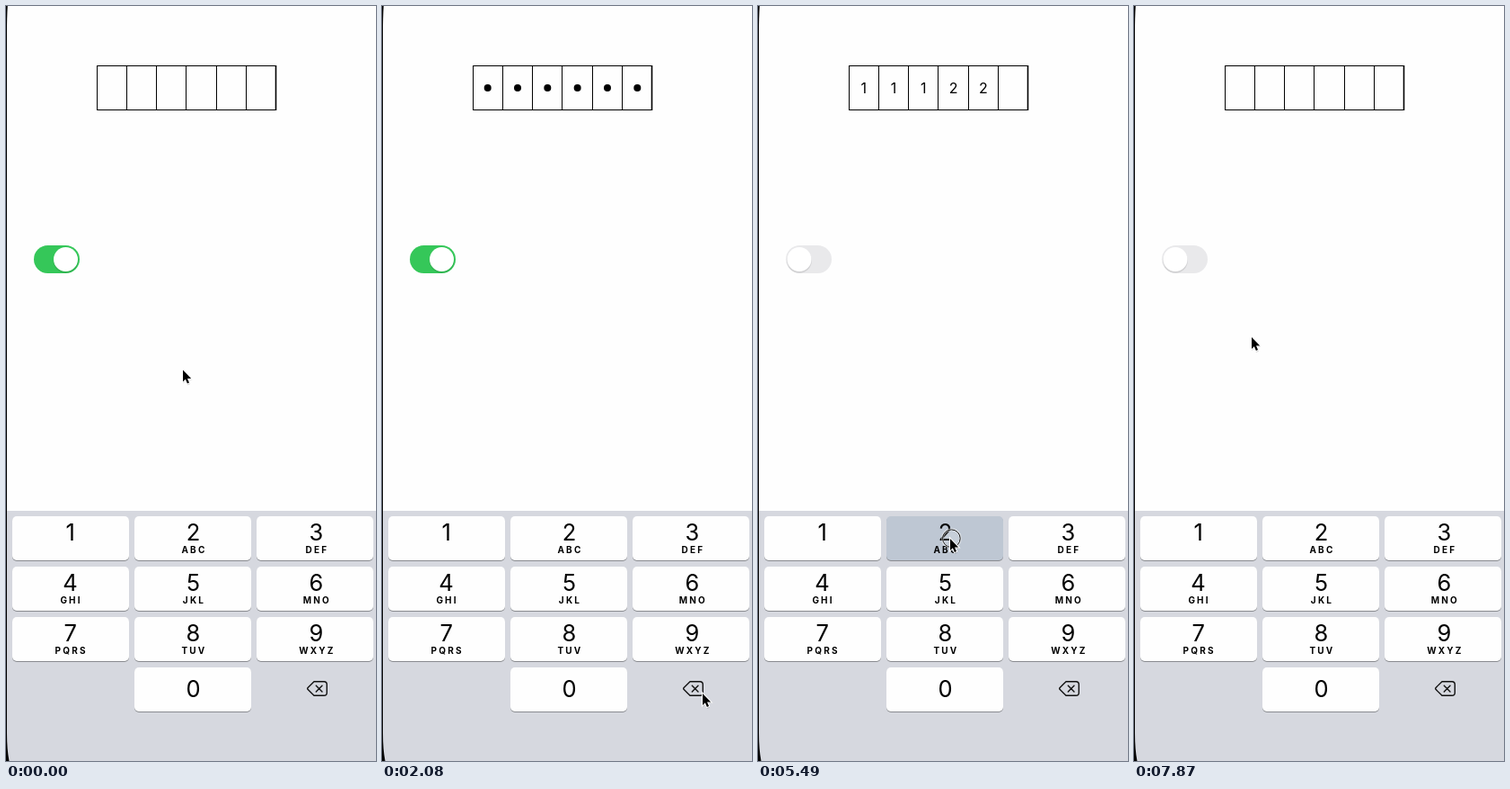
An HTML page for the animation above (8 s loop, 412x839 px).

```html
<!DOCTYPE html>
<html lang="en">
<head>
<meta charset="utf-8">
<title>Passcode field</title>
<style>
html, body { margin: 0; width: 100%; height: 100%; overflow: hidden; background: #fefefe; }
svg { display: block; width: 412px; height: 839px; font-family: Inter, Roboto, sans-serif; text-anchor: middle; }
.num { font-size: 25.5px; }
.sub { font-size: 10px; font-weight: 700; letter-spacing: 2.2px; }
.cell { font-size: 16px; }
</style>
</head>
<body>
<svg id="stage" viewBox="0 0 412 839"></svg>
<script>
const LOOP = 8000, HOLD = 60, FADE = 45, SLIDE = 240;
const DEL = "delete", TOGGLE = "toggle";
const CELLS = 6, LEFT = 101, CELL = 33.33;

const stops = [], taps = [];

// The pointer arrives at a spot, taps there, and leaves after the last tap.
function visit(arrive, x, y, target, first, count = 1, gap = 150) {
  let leave = arrive;
  if (target) {
    for (let i = 0; i < count; i++) taps.push({ at: first + i * gap, target });
    leave = first + (count - 1) * gap + HOLD;
  }
  stops.push({ arrive, leave, x, y });
}

visit(20, 197, 404.5);
visit(620, 109, 609.5, "1", 700, 2);
visit(1040, 219, 605, "2", 1150, 2);
visit(1560, 352, 600, "3", 1575, 2, 125);
visit(1930, 369, 806);
visit(2075, 357, 764, DEL, 2370, 6);
visit(3720, 52, 284, TOGGLE, 3820);
visit(4300, 152, 582);
visit(4600, 124, 601, "1", 4650, 3);
visit(5200, 214, 592, "2", 5230, 2, 210);
visit(5640, 361, 602, "3", 5770);
visit(6230, 360, 787);
visit(6430, 349, 763, DEL, 6660, 6);
visit(7860, 131, 368);

const letters = ["", "ABC", "DEF", "GHI", "JKL", "MNO", "PQRS", "TUV", "WXYZ"];
const digits = [..."1234567890"];
const stage = document.getElementById("stage");
const $ = id => document.getElementById(id);
const clamp = v => Math.max(0, Math.min(1, v));
const ease = v => v * v * (3 - 2 * v);
const lerp = (a, b, k) => a + (b - a) * k;
const mix = (a, b, k) => `rgb(${a.map((v, i) => Math.round(lerp(v, b[i], k)))})`;
const repeat = (n, make) => Array.from({ length: n }, (_, i) => make(i)).join("");

function keySvg(n, order) {
  const i = n === "0" ? 10 : order, col = i % 3;
  const x = 7 + col * 136, y = 567 + Math.floor(i / 3) * 56;
  const cx = x + 64.6 + col * .9, sub = letters[i];
  return `<rect x="${x}" y="${y + 1}" width="130" height="49" rx="5" fill="#898b90"/>
    <rect id="key${n}" x="${x}" y="${y}" width="130" height="49" rx="5"/>
    <text class="num" x="${cx}" y="${y + (n === "0" ? 33 : 26.5)}">${n}</text>
    ${sub ? `<text class="sub" x="${cx + 1}" y="${y + 41}">${sub}</text>` : ""}`;
}

function cellSvg(i) {
  const x = LEFT + i * CELL, cx = x + CELL / 2;
  return `<path d="M${Math.floor(x) + .5} 66V116" stroke="#000"/>
    <circle id="dot${i}" cx="${cx}" cy="91" r="4"/>
    <text id="digit${i}" class="cell" x="${cx}" y="96.8"></text>`;
}

stage.innerHTML = `
  <rect width="412" height="839" fill="#fefefe"/>
  <rect x="101.5" y="66.5" width="199" height="49" fill="none" stroke="#000"/>
  <path d="M300.5 66V116" stroke="#000" stroke-width="1.6"/>
  ${repeat(CELLS, cellSvg)}
  <rect id="track" x="31" y="266" width="51" height="31" rx="15.5"/>
  <g id="knob">
    <circle cy="283" r="13.8" opacity=".1"/>
    <circle cy="281.5" r="13.5" fill="#fff"/>
  </g>
  <rect y="561" width="412" height="278" fill="#d6d8df"/>
  ${digits.map(keySvg).join("")}
  <path d="M343 750.7H354Q357.3 750.7 357.3 754V763Q357.3 766.3 354 766.3H343L336.2 759.6Q335.2 758.5 336.2 757.4Z
    M345.3 755.2L352 761.9M352 755.2L345.3 761.9" fill="none" stroke="#111" stroke-width="1.4"
    stroke-linejoin="round" stroke-linecap="round"/>
  <path d="M0 0H1.8Q1 12 1 30V808Q1 826 3.5 839H0Z"/>
  <g id="pointer">
    <g id="ring" fill="none">
      <circle cx="1.4" cy="-.3" r="10" fill="#fff" fill-opacity=".14" stroke="#fff" stroke-opacity=".6" stroke-width="2.4"/>
      <circle cx="1.4" cy="-.3" r="9.8" stroke="#111"/>
    </g>
    <path d="M0 1V15L3 12.3L5 17L8 15.8L6 11H10.5Z" opacity=".16"/>
    <path d="M0 0V13L2.9 10.3L4.9 15L7 14.1L5 9.5H9.2Z" stroke="#fff" stroke-width="2" paint-order="stroke"/>
  </g>`;

function pointerAt(t) {
  const next = stops.findIndex(s => s.arrive > t);
  const b = stops.at(next), a = next > 0 ? stops[next - 1] : b;
  const k = a === b ? 0 : ease(clamp((t - a.leave) / (b.arrive - a.leave)));
  return [lerp(a.x, b.x, k), lerp(a.y, b.y, k)];
}

function draw(t) {
  const entry = [];
  let held = null, off = 0;
  for (const { at, target } of taps) {
    if (t < at) break;
    if (t < at + HOLD) held = target;
    if (target === DEL) entry.pop();
    else if (target === TOGGLE) off = ease(clamp((t - at - HOLD) / SLIDE));
    else entry.push({ digit: target, alpha: clamp((t - at) / FADE) });
  }

  for (let i = 0; i < CELLS; i++) {
    const { digit, alpha } = entry[i] || { digit: "", alpha: 0 };
    $("dot" + i).setAttribute("opacity", off ? 0 : alpha);
    $("digit" + i).textContent = off ? digit : "";
    $("digit" + i).setAttribute("opacity", alpha);
  }
  for (const n of digits) $("key" + n).setAttribute("fill", held === n ? "#bec7d3" : "#fefefe");

  $("track").setAttribute("fill", mix([53, 199, 89], [233, 233, 235], off));
  $("knob").setAttribute("transform", `translate(${lerp(66.5, 46, off)})`);
  $("pointer").setAttribute("transform", `translate(${pointerAt(t)})`);
  $("ring").setAttribute("opacity", held ? 1 : 0);
}

const start = performance.now();
function tick() {
  draw((performance.now() - start) % LOOP);
  requestAnimationFrame(tick);
}
tick();
</script>
</body>
</html>
```
